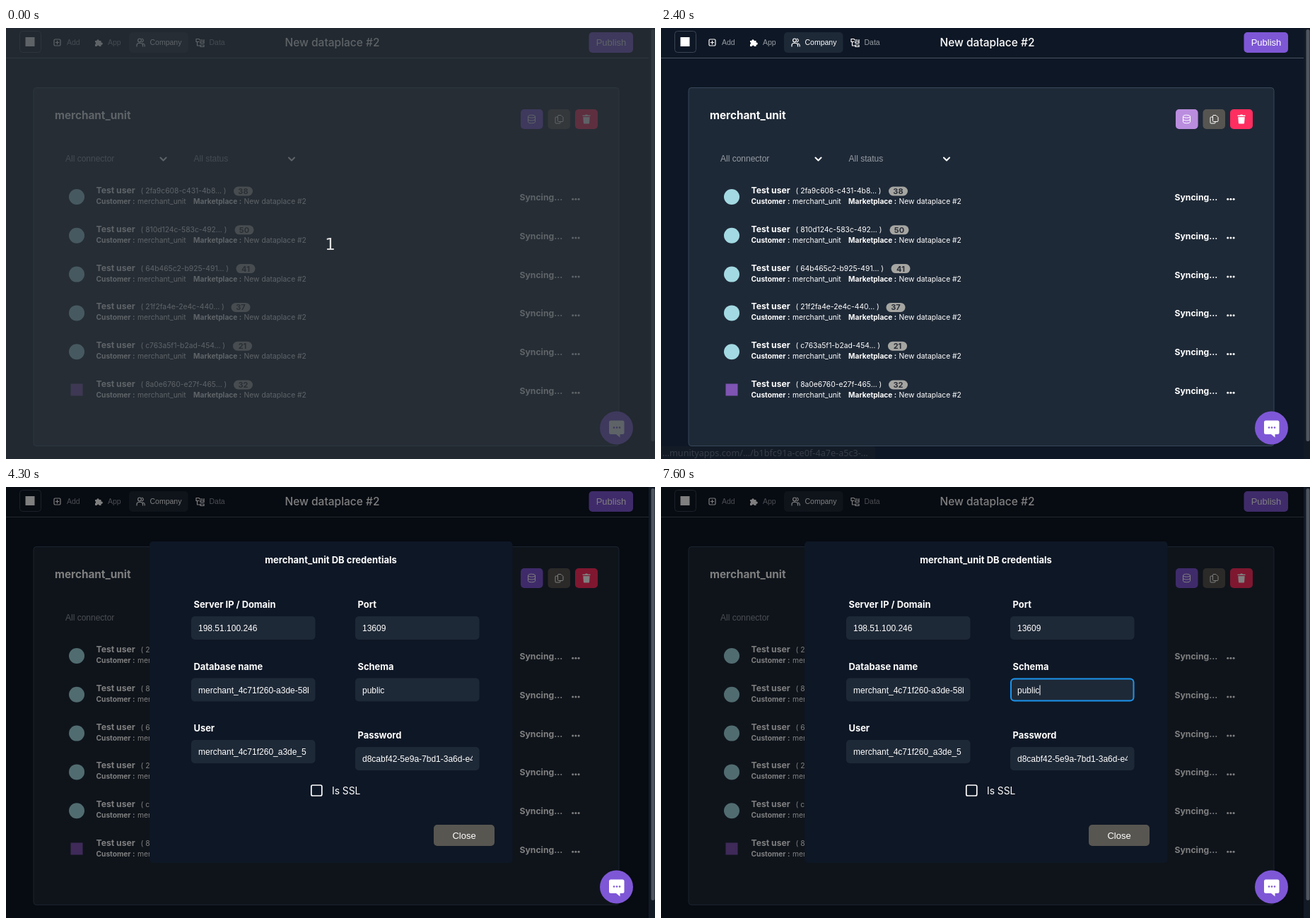
Animation, 918 px wide and 610 px high, one loop 8000 ms. Source, as an HTML page:

```html
<!DOCTYPE html>
<html lang="en">
<head>
<meta charset="utf-8">
<title>Database credentials</title>
<style>
html, body { margin: 0; width: 100%; height: 100%; overflow: hidden; background: #0e1725; }
svg { display: block; }
text { white-space: pre; fill: #fff; }
.ui { font-family: Inter, sans-serif; }
.form { font-family: "Liberation Sans", Arial, sans-serif; }
.b { font-weight: 700; }
.line { fill: none; stroke: #fff; stroke-width: 1.2; stroke-linecap: round; stroke-linejoin: round; }
</style>
</head>
<body>
<script>
const PURPLE = '#7e57d6', PAGE = '#0e1725', PANEL = '#1e2937';
const box = (x, y, w, h, r, fill, more = '') =>
  `<rect x="${x}" y="${y}" width="${w}" height="${h}" rx="${r}" fill="${fill}" ${more}/>`;
const dot = (x, y, r, fill) => `<circle cx="${x}" cy="${y}" r="${r}" fill="${fill}"/>`;
const text = (x, y, size, str, cls = 'ui', more = '') =>
  `<text x="${x}" y="${y}" font-size="${size}" class="${cls}" ${more}>${str}</text>`;
const line = (d, more = '') => `<path class="line" d="${d}" ${more}/>`;
const group = (id, body) => `<g id="${id}">${body}</g>`;
const grey = 'style="fill:#979da5"', mid = 'text-anchor="middle"';

const header = `
  <path d="M0 42.5H909" stroke="#465261"/>
  ${box(19.5, 4.5, 30, 30, 4, PAGE, 'stroke="#3a4554"')}
  ${box(27.5, 13, 13, 13, 0, '#fff')}
  ${line('M69.5 16h6a1.5 1.5 0 0 1 1.5 1.5v6a1.5 1.5 0 0 1-1.5 1.5h-6a1.5 1.5 0 0 1-1.5-1.5v-6a1.5 1.5 0 0 1 1.5-1.5zM72.5 18.3v4.4M70.3 20.5h4.4')}
  ${text(86, 24, 10.5, 'Add', 'form', 'id="add" style="fill:#979da5"')}
  <path fill="#fff" d="M126 18h2.3a1.7 1.7 0 1 1 3.4 0h2.8v2.6a1.7 1.7 0 1 1 0 3.2v2.2h-2.8a1.5 1.5 0 0 0-3 0h-2.7v-3a1.6 1.6 0 0 0 0-3z"/>
  ${text(144, 24, 10.5, 'App', 'form', grey)}
  ${box(174, 6, 83.5, 29, 5, PANEL)}
  ${line('M185 26v-1.5a3 3 0 0 1 3-3h2.5a3 3 0 0 1 3 3V26M192.5 15.2a2.4 2.4 0 0 1 0 4.6M194 22a3 3 0 0 1 2.2 2.8V26')}
  <circle class="line" cx="189" cy="17.4" r="2.4"/>
  ${text(203.5, 24, 10.5, 'Company', 'form')}
  ${line('M269 15.5h4l1 1.5h4M269 15.5v4h4M275 19h5v2.5h-5zM275 24h5v2.5h-5zM270.5 19.5v5.5h4M280 16.5v2')}
  ${text(287.5, 24, 10.5, 'Data', 'form', grey)}
  ${text(461.5, 26, 15.5, 'New dataplace #2', 'ui', mid + ' font-weight="500"')}
  ${box(824.5, 6, 62.5, 29, 5, PURPLE)}
  ${text(856, 25, 13, 'Publish', 'form', mid)}`;

const tools = `
  ${box(728, 115, 31.5, 28, 5, PURPLE)}
  ${box(728, 115, 31.5, 28, 5, '#dbabe3', 'id="pink"')}
  ${line('M738.5 125.2a5 2 0 0 1 10 0a5 2 0 0 1-10 0v7.6a5 2 0 0 0 10 0v-7.6M738.5 129a5 2 0 0 0 10 0', 'style="stroke-width:1"')}
  ${box(766.5, 115, 31.5, 28, 5, '#575551')}
  ${line('M781.5 123.5h3.5l3 3v5a1 1 0 0 1-1 1h-5.5a1 1 0 0 1-1-1v-7a1 1 0 0 1 1-1zM780 126h-2a1 1 0 0 0-1 1v7a1 1 0 0 0 1 1h5a1 1 0 0 0 1-1v-1', 'style="stroke-width:1"')}
  ${box(805, 115, 32, 28, 5, '#ff2e60')}
  <path fill="#fff" d="M815.5 123.5h3.5l.8-1h2.4l.8 1h3.5v1.5h-11zM816.3 126h9.4l-.6 8.5a1 1 0 0 1-1 1h-6.2a1 1 0 0 1-1-1z"/>`;

const users = [
  ['2fa9c608-c431-4b8', 38, 322], ['810d124c-583c-492', 50, 323.5], ['64b465c2-b925-491', 41, 325.5],
  ['21f2fa4e-2e4c-440', 37, 318.5], ['c763a5f1-b2ad-454', 21, 321], ['8a0e6760-e27f-465', 32, 322]];
const row = ([id, count, x], i) => `<g transform="translate(0 ${i * 54.8})">
  ${i < 5 ? dot(100, 239, 11, '#a3d9e2') : box(91.5, 229.5, 17, 17, 0, '#7f54b3')}
  ${text(127.5, 234, 12.2, 'Test user', 'ui b')}
  ${text(190.5, 234, 10.3, `( ${id}... )`)}
  ${box(x, 224.5, 27, 13, 6.5, '#a5a5a2')}
  ${text(x + 13.5, 235, 11, count, 'ui b', mid + ' style="fill:#2a2f36"')}
  ${text(127.5, 249, 10.2, 'Customer :', 'ui b')}
  ${text(186, 249, 10.3, 'merchant_unit')}
  ${text(265, 249, 10.2, 'Marketplace :', 'ui b')}
  ${text(336.5, 249, 10.3, 'New dataplace #2')}
  ${text(726.5, 244, 12.2, 'Syncing...', 'ui b')}
  ${[801.7, 805.9, 810.1].map(x => dot(x, 242.3, 1.5, '#fff')).join('')}
</g>`;

const list = `
  ${box(39, 84.5, 828, 507, 4, PANEL, 'stroke="#37475a"')}
  ${text(69, 129, 15.3, 'merchant_unit', 'ui b')}
  ${tools}
  ${text(84, 189, 12, 'All connector', 'form', grey)}
  ${text(265.5, 189, 12, 'All status', 'form', grey)}
  ${line('M218.5 183.5l4 4 4-4M400 183.5l4 4 4-4', 'style="stroke-width:2"')}
  ${users.map(row).join('')}`;

// label, placeholder, value, left, top, caret
const fields = [
  ['Server IP / Domain', '8.8.8.8', '198.51.100.246', 262, 183, 354],
  ['Port', '5432', '13609', 494, 183, 537],
  ['Database name', 'my_customer_databsase', 'merchant_4c71f260-a3de-58b2', 262, 270.5, 427],
  ['Schema', 'public', 'public', 494, 270.5, 535.5],
  ['User', 'dbaccount', 'merchant_4c71f260_a3de_5', 262, 358],
  ['Password', 'postgresql_password', 'd8cabf42-5e9a-7bd1-3a6d-e4f8', 494, 368]];
const field = ([label, hint, value, x, y, caret], i) => `
  ${text(x + 3.5, y - 12, 12.9, label, 'ui b')}
  ${box(x, y, 175.5, 33, 5, PANEL)}
  ${box(x + 1, y + 1, 173.5, 31, 5, 'none', `id="ring${i}" stroke="#1a94ee" stroke-width="2"`)}
  <svg x="${x + 10}" y="${y}" width="156" height="33">
    ${text(0, 21, 12, hint, 'form hint', grey)}${text(0, 21, 12, value, 'form value')}
  </svg>
  ${caret ? box(caret, y + 10, 1, 14, 0, '#fff', `id="caret${i}"`) : ''}`;

const modal = `
  ${box(203, 77, 513.5, 455, 5, PAGE)}
  ${text(459.5, 107.5, 13, 'merchant_unit DB credentials', 'ui b', mid)}
  ${fields.map(field).join('')}
  ${box(431.8, 422, 15, 15, 2, 'none', 'stroke="#fff" stroke-width="1.7"')}
  ${text(461, 434.5, 13.8, 'Is SSL')}
  ${box(605, 478, 86, 30, 5, '#585651')}
  ${text(648, 498, 13, 'Close', 'form', mid)}`;

const chat = `
  ${dot(863.5, 566, 23.5, PURPLE)}
  <path fill="#fff" d="M855.5 555.5h16.5a2.5 2.5 0 0 1 2.5 2.5v14.5a2.5 2.5 0 0 1-2.5 2.5h-3.5v4.5l-5.5-4.5h-7.5a2.5 2.5 0 0 1-2.5-2.5v-14.5a2.5 2.5 0 0 1 2.5-2.5z"/>
  ${[860, 864, 868].map(x => dot(x, 565.5, 1.3, PURPLE)).join('')}`;

document.body.innerHTML = `<svg width="918" height="610" viewBox="0 0 918 610">
  ${box(0, 0, 918, 610, 0, PAGE)}
  ${header}${list}
  ${box(0, 0, 909, 610, 0, '#000', 'id="shade"')}
  ${group('modal', modal)}
  ${chat}
  ${box(909, 0, 9, 610, 0, '#121a26')}${box(912.5, 2, 5, 583, 2.5, '#50565f')}
  ${group('status', box(-4, 592, 307, 22, 3, '#2b2d30') +
    text(2, 605.5, 12.65, '…munityapps.com/…/b1bfc91a-ce0f-4a7e-a5c3-…', '', 'font-family="Noto Sans, sans-serif" style="fill:#d8d8d8"'))}
  ${group('count', box(0, 0, 918, 610, 0, 'rgba(40,47,53,.75)') +
    text(458.5, 314, 23, '1', '', mid + ' font-family="DejaVu Sans, sans-serif" style="fill:#e2e2e2"'))}
</svg>`;

const $ = id => document.getElementById(id);
const alpha = (id, v) => { const el = $(id); if (el) el.style.opacity = v; };
const during = (t, a, b) => t >= a && t < b ? 1 : 0;
// level at each 100 ms step from a start time; holds the last one
const steps = (t, start, levels, before = 0) =>
  t < start ? before : levels[Math.min(levels.length - 1, Math.floor((t - start) / 100))];

// focus start, focus end, caret end
const focus = [[5600, 6300, 6100], [6300, 7000, 6900], [7000, 7500, 7500], [7500, 9000, 9000]];
const hints = document.querySelectorAll('.hint'), values = document.querySelectorAll('.value');

function draw(t) {
  alpha('count', during(t, 0, 100));
  $('add').style.fill = during(t, 500, 600) ? '#d5d9de' : '#979da5';
  alpha('status', t < 2200 ? steps(t, 1700, [.5, .85, 1]) : steps(t, 2200, [.85, .5, .2, 0]));
  alpha('pink', t < 3900 ? steps(t, 2200, [.1, .35, .65, .9, 1]) : steps(t, 3900, [.25, .05, 0]));
  alpha('shade', steps(t, 3900, [.35, .46, .5]));
  alpha('modal', steps(t, 3900, [.83, .96, 1]));
  const filled = t >= 4300;
  hints.forEach(el => el.style.opacity = filled ? 0 : 1);
  values.forEach(el => el.style.opacity = filled ? 1 : 0);
  fields.forEach((f, i) => {
    const [a, b, off] = focus[i] || [9e3, 9e3, 9e3];
    alpha('ring' + i, t < b ? steps(t, a, [.5, 1]) : steps(t, b, [.5, 0]));
    alpha('caret' + i, during(t, a, off));
  });
}
const start = performance.now();
(function tick() {
  draw((performance.now() - start) % 8000);
  requestAnimationFrame(tick);
})();
</script>
</body>
</html>
```
